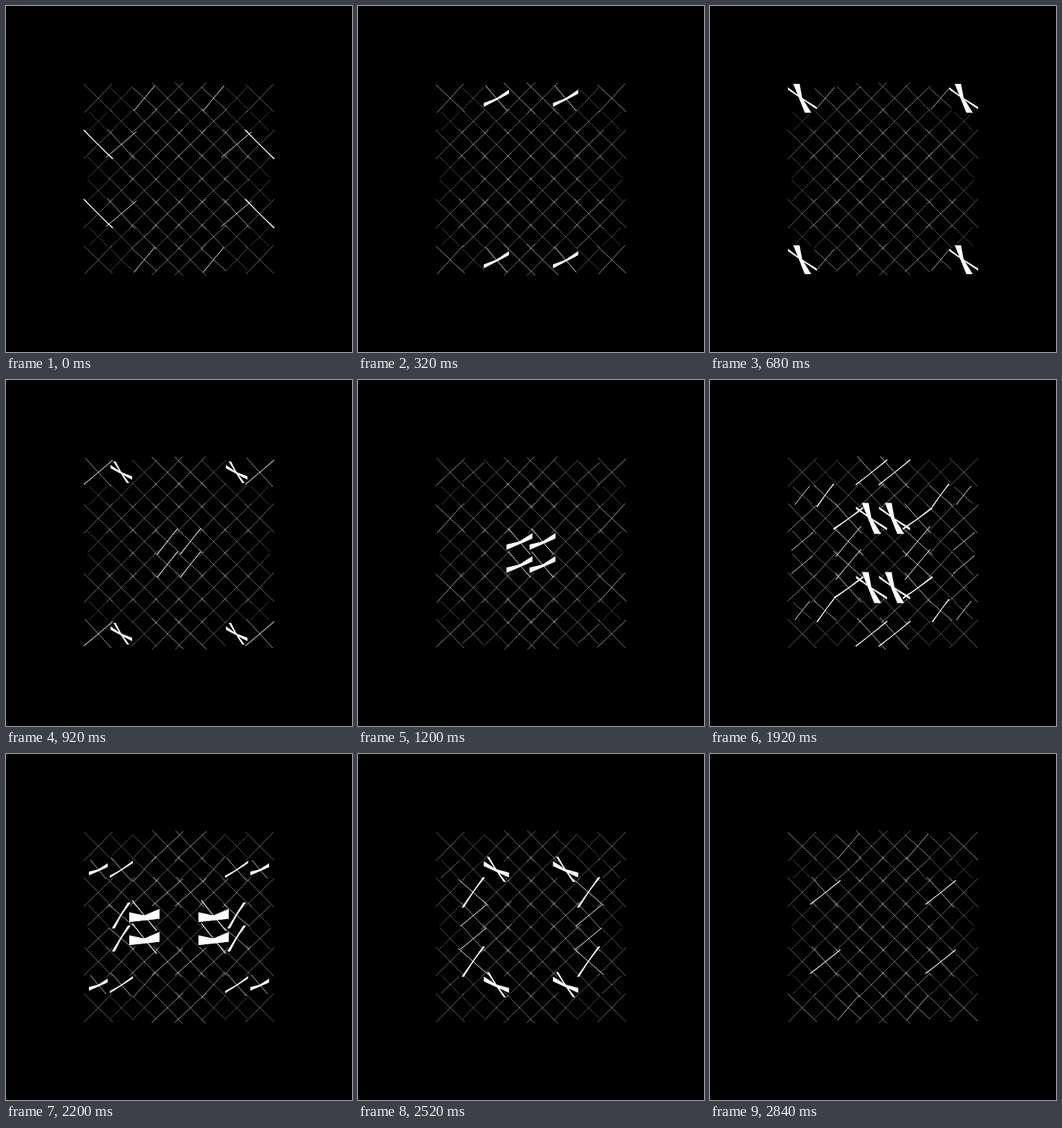
These frames come from a looping animation (480x480 px, 2.88 s). An HTML page with a canvas:

```html
<!DOCTYPE html>
<html lang="en">
<head>
<meta charset="utf-8">
<title>Turning crosses</title>
<style>
html, body { margin: 0; height: 100%; overflow: hidden; background: #000; }
canvas { display: block; }
</style>
</head>
<body>
<canvas id="stage" width="480" height="480"></canvas>
<script>
const ctx = document.getElementById('stage').getContext('2d');
const LOOP = 2880, FRAME = 40;
const SOFTNESS = 40;  // time constant of a swing, ms
const TRAIL = 46;     // swept time that gives a bar its width, ms
const STAGGER = 58;   // each bar leads or lags the middle of the turn, ms

// One quadrant, mirrored to all four: half size and middle of the turn.
const SIZES = [
  [20, 15, 17.5, 22],
  [13, 16, 17.5, 18],
  [20.5, 21, 20.5, 21.5],
  [15, 18, 21, 18]
];
const TURNS = [
  [680, 890, 190, 1720],
  [2080, 2050, 2480, 1520],
  [1497, 2640, 1750, 1920],
  [1690, 2300, 2110, 1080]
];

const wrap = t => ((t % LOOP) + LOOP) % LOOP;
const swing = t => Math.atan(t / SOFTNESS) * 2 / Math.PI;

function triangle(...points) {
  ctx.beginPath();
  for (const [x, y] of points) ctx.lineTo(x, y);
  ctx.closePath();
  ctx.fill();
}

// Strip of two triangles between an earlier and a later line through the centre.
function bar([ax, ay], [bx, by], size) {
  triangle([ax, ay], [-ax, -ay], [bx, by]);
  triangle([-ax, -ay], [bx, by], [-bx, -by]);
  ctx.lineWidth = size * 0.019;
  ctx.beginPath();
  ctx.moveTo(bx, by);
  ctx.lineTo(-bx, -by);
  ctx.stroke();
}

function cross(size, turn, time) {
  const t = wrap(time - turn + LOOP / 2) - LOOP / 2;
  const top = s => [-size * swing(s + STAGGER), -size];
  const left = s => [-size, size * swing(s - STAGGER)];
  bar(top(t - TRAIL), top(t), size);
  bar(left(t - TRAIL), left(t), size);

  // Brief flash as the first bar starts over.
  if (wrap(time - turn + STAGGER + LOOP / 2) < FRAME) {
    bar([-size * 0.95, -size], [-size, -size * 0.95], size);
  }
}

function draw(time) {
  ctx.fillStyle = '#000';
  ctx.fillRect(0, 0, 480, 480);
  ctx.fillStyle = ctx.strokeStyle = '#fff';
  for (let row = 0; row < 8; row++) {
    for (let col = 0; col < 8; col++) {
      const r = Math.min(row, 7 - row), c = Math.min(col, 7 - col);
      ctx.save();
      ctx.translate(128 + col * 32, 128 + row * 32);
      cross(SIZES[r][c], TURNS[r][c], time);
      ctx.restore();
    }
  }
}

const start = performance.now();
function tick() {
  const time = (performance.now() - start) % LOOP;
  draw(Math.floor(time / FRAME) * FRAME);
  requestAnimationFrame(tick);
}
tick();
</script>
</body>
</html>
```
